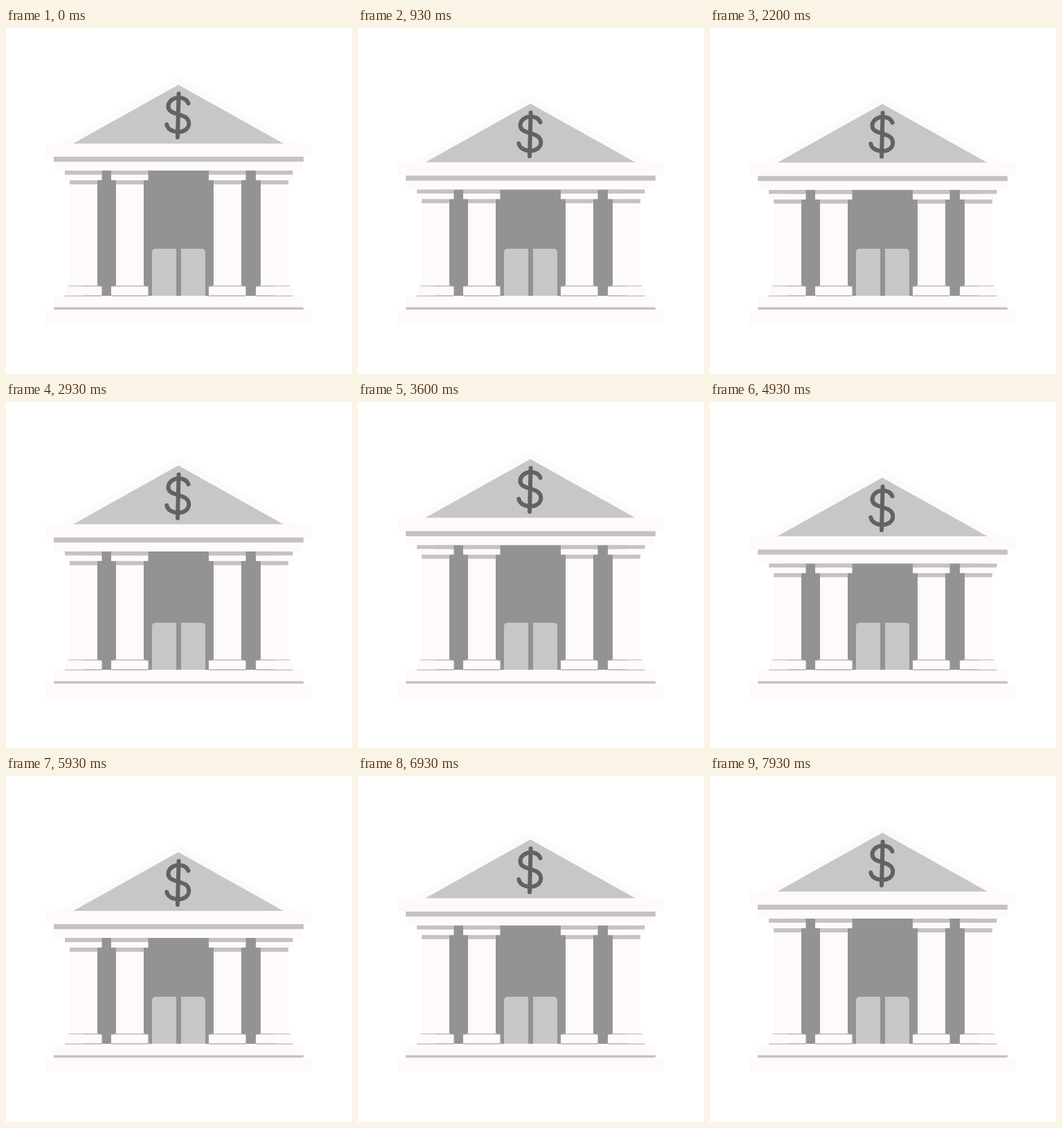
Write an HTML page with a canvas that moves like this. It is 500 by 500 pixels and loops after 7.99 s.

```html
<!DOCTYPE html>
<html lang="en">
<head>
<meta charset="utf-8">
<title>Bank</title>
<style>
  html, body { margin: 0; width: 100%; height: 100%; overflow: hidden; background: #fff; }
  canvas { display: block; width: 500px; height: 500px; }
</style>
</head>
<body>
<canvas id="stage" width="500" height="500"></canvas>
<script>
const ctx = document.getElementById('stage').getContext('2d');
const LOOP = 7990, CYCLE = 4000, STEP = 1000 / 15;
const DROP = 28;
const WALL = '#fefafa', SHADE = '#c6c2c2', PANEL = '#c8c7c7', DARK = '#949393', SIGN = '#626262';
const COLUMNS = [85, 152, 293, 361];

// Cubic easing with horizontal end tangents, solved by bisection
function ease(x, x1, x2) {
  if (x <= 0) return 0;
  if (x >= 1) return 1;
  let lo = 0, hi = 1;
  for (let i = 0; i < 30; i++) {
    const s = (lo + hi) / 2, r = 1 - s;
    if (3 * r * r * s * x1 + 3 * r * s * s * x2 + s * s * s < x) lo = s; else hi = s;
  }
  return lo * lo * (3 - 2 * lo);
}

// Sinks quickly, settles the last bit, then rises again
function roofOffset(t) {
  if (t >= 2000) return DROP * (1 - ease((t - 2000) / 2000, 0.75, 0.08));
  const settle = Math.min(1, Math.max(0, (t - 850) / 1000));
  return 27.2 * ease(t / 900, 0.4, 0.4) + 0.8 * settle;
}

function box(x1, y1, x2, y2, color) {
  ctx.fillStyle = color;
  ctx.fillRect(x1, y1, x2 - x1, y2 - y1);
}

function triangle(apexY, left, right, baseY, color) {
  ctx.fillStyle = color;
  ctx.beginPath();
  ctx.moveTo(249, apexY);
  ctx.lineTo(right, baseY);
  ctx.lineTo(left, baseY);
  ctx.fill();
}

function doors() {
  ctx.fillStyle = PANEL;
  ctx.beginPath();
  ctx.roundRect(211, 319, 77, 68, [5, 5, 0, 0]);
  ctx.fill();
  box(246, 319, 253, 387, DARK);
}

function column(x, dy) {
  box(x + 7, 212 + dy, x + 47, 373, WALL);
  box(x, 206 + dy, x + 53.5, 212 + dy, SHADE);
  box(x, 212 + dy, x + 53.5, 220 + dy, WALL);
  box(x + 7, 220 + dy, x + 47, 226 + dy, SHADE);
  box(x + 5, 372, x + 49, 373.5, SHADE);
  box(x, 373.5, x + 53.5, 386.5, WALL);
  box(x, 386.5, x + 53.5, 388, SHADE);
}

function dollar() {
  ctx.strokeStyle = SIGN;
  ctx.lineWidth = 6;
  ctx.lineCap = 'round';
  ctx.beginPath();
  ctx.moveTo(249.6, 95);
  ctx.lineTo(248, 158);
  ctx.moveTo(263.5, 109);
  ctx.bezierCurveTo(259, 96, 235, 99, 234.5, 113);
  ctx.bezierCurveTo(234, 128, 264, 121, 264.3, 138);
  ctx.bezierCurveTo(264, 154, 235, 154, 232.3, 139.5);
  ctx.stroke();
}

function roof() {
  triangle(70, 76, 422, 168, WALL);
  triangle(82, 97, 401, 167, PANEL);
  box(57, 167, 441, 186, WALL);
  box(69, 186, 430, 193.5, SHADE);
  box(70, 193.5, 429, 206, WALL);
  dollar();
}

function draw(time) {
  const tick = Math.floor((time % LOOP + 4) / STEP);
  const dy = roofOffset(tick * STEP % CYCLE);
  box(0, 0, 500, 500, '#fff');
  box(112, 206 + dy, 388, 387, DARK);
  doors();
  COLUMNS.forEach(x => column(x, dy));
  box(69, 388, 430, 403.5, WALL);
  box(69, 403.5, 430, 407, SHADE);
  box(57, 407, 441, 428, WALL);
  ctx.save();
  ctx.translate(0, dy);
  roof();
  ctx.restore();
}

const start = performance.now();
function frame() {
  draw(performance.now() - start);
  requestAnimationFrame(frame);
}
frame();
</script>
</body>
</html>
```
